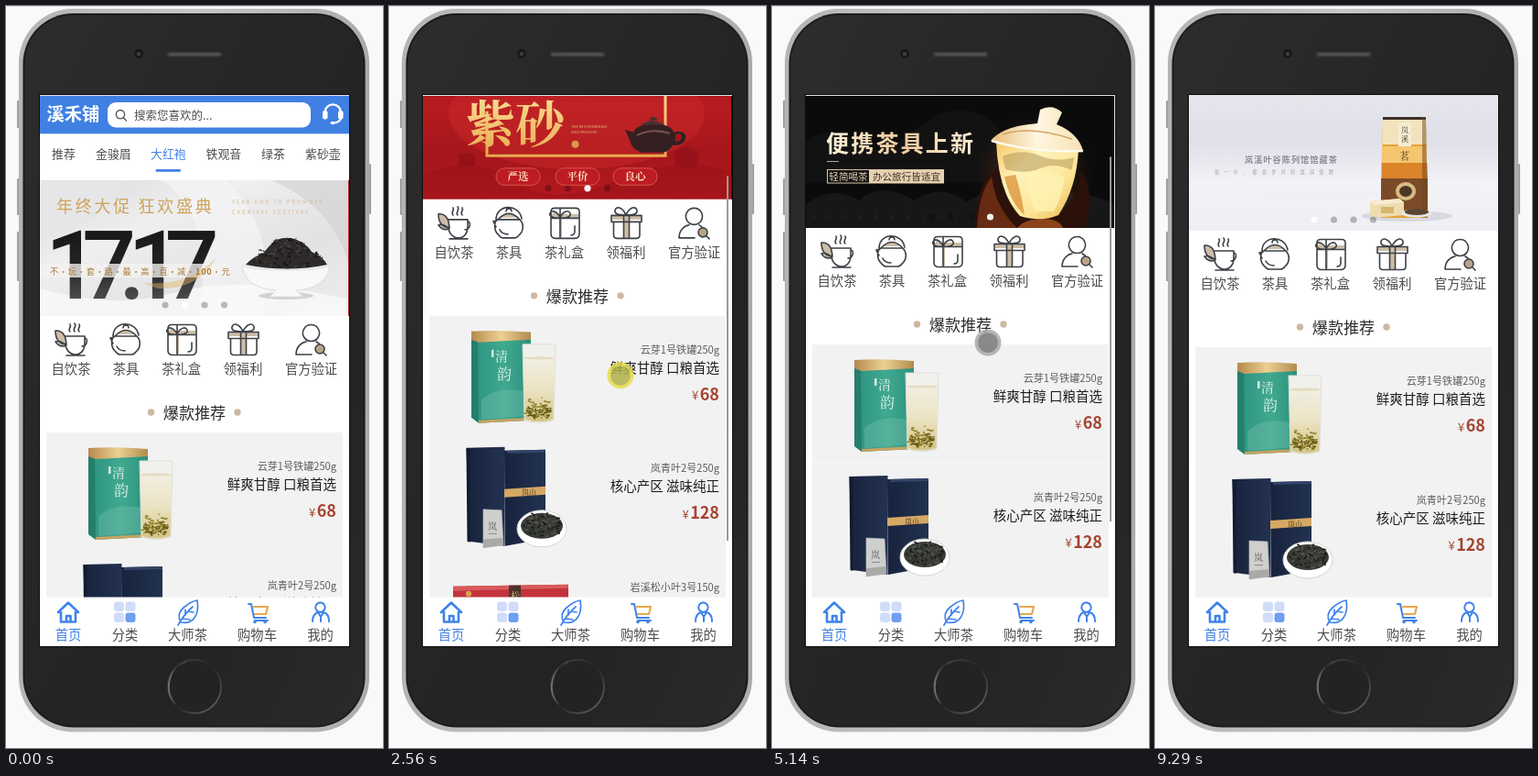
Recreate the animation shown at these times as an HTML page. Size 412 by 809 pixels, loop 9950 ms.

```html
<!DOCTYPE html>
<html lang="zh">
<head>
<meta charset="utf-8">
<style>
html, body { margin: 0; width: 100%; height: 100%; overflow: hidden; background: #f8faf9; }
svg { display: block; width: 412px; height: 809px; font-family: "Noto Sans CJK SC", "Noto Sans CJK", "Noto Sans", sans-serif; }
.ln { fill: none; stroke: #3d4147; stroke-width: 1.6; stroke-linecap: round; stroke-linejoin: round; }
.bl { fill: none; stroke: #3f83ea; stroke-width: 2.2; stroke-linecap: round; stroke-linejoin: round; }
.serif { font-family: "Noto Serif CJK SC", "Noto Sans CJK SC", "Noto Serif", serif; }
</style>
</head>
<body>
<svg viewBox="0 0 412 809" xmlns="http://www.w3.org/2000/svg"></svg>
<script>
const LOOP = 9950, STRIDE = 337, PITCH = 129.5;
const svg = document.querySelector('svg');
const rect = (x, y, w, h, fill, rx = 0, more = '') =>
  `<rect x="${x}" y="${y}" width="${w}" height="${h}" fill="${fill}" rx="${rx}" ${more}/>`;
const oval = (x, y, rx, ry, fill, more = '') =>
  `<ellipse cx="${x}" cy="${y}" rx="${rx}" ry="${ry}" fill="${fill}" ${more}/>`;
const path = (d, fill, more = '') => `<path d="${d}" fill="${fill}" ${more}/>`;
const line = (d, cls = 'ln', more = '') => `<path d="${d}" class="${cls}" ${more}/>`;
const text = (x, y, size, fill, s, more = '') =>
  `<text x="${x}" y="${y}" font-size="${size}" fill="${fill}" ${more}>${s}</text>`;
const mid = 'text-anchor="middle"', end = 'text-anchor="end"', bold = 'font-weight="700"';
const grad = (id, dir, ...stops) => `<linearGradient id="${id}" x2="${dir[0]}" y2="${dir[1]}">` +
  stops.map((c, i) => `<stop offset="${i / (stops.length - 1)}" stop-color="${c}"/>`).join('') + '</linearGradient>';

function random(seed) {
  return () => (seed = (seed * 16807) % 2147483647) / 2147483647;
}

// Loose tea: short curled strokes inside an ellipse
function leaves(x, y, rx, ry, n, colors, seed) {
  const r = random(seed);
  let out = '';
  for (let i = 0; i < n; i++) {
    const a = r() * 6.283, d = Math.sqrt(r());
    const px = x + Math.cos(a) * rx * d, py = y + Math.sin(a) * ry * d;
    out += `<path d="M${px.toFixed(1)} ${py.toFixed(1)}q${(r() * 6 - 3).toFixed(1)} ${(r() * 5 - 3).toFixed(1)} ${(r() * 9 - 4.5).toFixed(1)} ${(r() * 5 - 2.5).toFixed(1)}" stroke="${colors[i % colors.length]}" stroke-width="1.6" fill="none"/>`;
  }
  return out;
}

const defs = `<defs>
${grad('body', [1, 1], '#2d2d2e', '#272727', '#232323', '#2a2a2a')}
${grad('ring', [1, 0], '#b2b4b6', '#c6c7c9', '#a9abad')}
${grad('home', [1, 1], '#4a4a4a', '#242424', '#6a6a6a')}
${grad('home2', [1, 0], '#777', '#262626', '#4c4c4c')}
${grad('silver', [1, 1], '#d9d9db', '#efeff0', '#e2e2e4', '#eeeeef')}
${grad('num', [0, 1], '#111', '#242426', '#68686b')}
${grad('red', [0, 1], '#a3161c', '#b51b20', '#a5161b', '#b3191f')}
${grad('cream', [1, 0], '#fff3dc', '#edc99d', '#fff0d5')}
${grad('gold', [0, 1], '#ffe6a0', '#e8a94c')}
${grad('mist', [0, 1], '#e6e7ed', '#dfe0e8', '#f3f3f7', '#e2e3e9')}
${grad('tin', [1, 0], '#2f9683', '#41a890', '#2a917d')}
${grad('lid', [1, 0], '#b58a4c', '#ecd093', '#b28b4e')}
${grad('tea', [0, 1], '#f1eee2', '#ebe3c2', '#d3c486')}
${grad('navy', [1, 0], '#18233d', '#223250')}
${grad('cup', [1, 1], '#f4c766', '#fff3bd', '#fde596', '#e9b24a')}
${grad('cover', [1, 0], '#e8bd78', '#fff6e0', '#f6e2b4')}
<radialGradient id="glow"><stop offset="0" stop-color="#c4651d" stop-opacity=".6"/><stop offset="1" stop-color="#50210c" stop-opacity="0"/></radialGradient>
<clipPath id="screen"><rect x="37" y="97" width="338" height="601"/></clipPath>
<clipPath id="slot"><rect x="37" y="190" width="338" height="148"/></clipPath>
</defs>`;

function phone() {
  return rect(0, 0, 412, 809, '#f8faf9') + rect(0, 0, 412, 1, '#dfe1e1') +
    [[103, 30], [188, 40], [246, 54]].map(b => rect(12, b[0], 4, b[1], '#9fa1a3', 1)).join('') +
    rect(395, 172, 4, 55, '#9fa1a3', 1) +
    rect(14, 3, 383, 788.5, 'url(#ring)', 59) + rect(18.5, 8, 374, 778.5, '#1c1c1c', 55) +
    rect(20.5, 10, 370, 774.5, 'url(#body)', 53) +
    oval(145, 52, 4.8, 4.8, '#171717') + oval(145, 52.3, 2.2, 2.2, '#3c3d48') +
    rect(176, 50, 60, 5.6, '#3d3d3d', 2.5) + rect(178, 51.3, 56, 3, '#535353', 1.5, 'stroke="#2c2c2c" stroke-dasharray="1 1" stroke-width=".6"') +
    oval(206, 742, 29, 29, '#232323', 'stroke="url(#home)" stroke-width="1.8"') +
    path('M186 762A29 29 0 0 1 196 715', 'none', 'stroke="url(#home2)" stroke-width="1.6"') +
    rect(36, 96, 340, 603, '#0c0c0c');
}

function shortcuts() {
  const tan = '#cdbda6';
  const art = [
    path('M54 354q11-1 12 15q-12-1-12-15z', tan) + path('M56 366q6-2 10 4q-7 2-10-4z', tan) +
      line('M54 354q11-1 12 15q-12-1-12-15zM65 360h21v8c0 7-4 12-10 12s-11-5-11-12M86 362c4 0 3 9-3 9M66 381h20M54 366q5-2 12 4q-7 3-12-4M70 355c-3-3 2-5 0-8M75 355c-3-3 3-5 0-9M80 355c-3-3 2-5 0-8'),
    path('M121 358q10-9 20 0z', tan) +
      line('M118 360h25c5 5 4 13-1 17q-2 3-5 3h-12q-3 0-5-3c-5-4-6-12-2-17zM120 359q11-11 22 0M128 351c0-4 6-4 6 0M117 368l-3-6 4-1M117 360c0-17 25-18 28-1M121 371c2 4 5 5 9 5'),
    path('M177 354h31v5h-31zM180 350l8 7-10 1z', tan) + rect(186, 358, 3, 21, tan) +
      line('M181 347.500h23q4 0 4 4v24q0 5-5 5h-21q-5 0-5-5v-24q0-4 4-4zM177 358.500h31M187 348v32M187 358c-3-7-9-9-11-5s6 6 11 5c3-7 9-9 11-5s-6 6-11 5M203 367v6q0 4-4 4'),
    rect(256, 357, 6, 23, tan) + path('M244 356h32v4h-32z', tan) +
      line('M243 355.500h33v7h-33zM245.500 363v14q0 3.500 3.500 3.500h21.500q3.500 0 3.500-3.500v-14M256.500 356v24M262.500 356v24M259 355c-4-9-11-10-12-5s7 5 12 5c4-9 11-10 12-5s-7 5-12 5'),
    oval(343, 374, 5, 5, '#b9a386') + line('M333.500 347.500a9 9 0 1 1-.1 0zM334 380h-17c0-8 5-13 11-14M339 366l3 2M347 378l3 3M338 374a5 5 0 1 0 10 0a5 5 0 1 0-10 0')
  ];
  return art.join('') + [[71, '自饮茶'], [131, '茶具'], [191.500, '茶礼盒'], [259, '领福利'], [333.500, '官方验证']]
    .map(([x, s]) => text(x, 401, 14.3, '#4c4c4c', s, mid)).join('');
}

const tinBox = y => `<g transform="translate(0 ${y})">` +
  path('M90 482l8 2v98l-8-6z', '#247e6c') + path('M97 484l58-1v96l-57 3z', 'url(#tin)') +
  path('M90 482q30-2 65 1v8l-57 3-8-3z', 'url(#lid)') + path('M98 582l57-3v-3l-57 3z', '#c7a361') +
  path('M101 556q20-16 50-8l2 26-52 4z', '#7dc4b0', 'opacity=".35"') +
  text(116, 514, 14, '#e9f5ee', '清', 'class="serif"') + text(118, 534, 16, '#e9f5ee', '韵', 'class="serif"') +
  rect(112, 502, 2.5, 8, '#d8ebdf') +
  path('M146 496h36l-2 83q-16 5-32 0z', '#f1f1ec', 'stroke="#dededa"') +
  path('M147 511h34l-1.500 67q-15 5-31 0z', 'url(#tea)') + oval(164, 511, 17, 1.6, '#e3dcc0') +
  leaves(164, 570, 14, 8, 60, ['#776b1d', '#95862e', '#5d5417'], 11) +
  leaves(164, 560, 13, 6, 12, ['#93832d'], 5) + '</g>';

const blueBoxes =
  path('M84.500 609l42-1v108l-39-5z', 'url(#navy)') + path('M84.500 609l4 2v101l-3-1z', '#121b30') +
  path('M126 612l45-1v97l-44 8z', 'url(#navy)') + path('M129 612l42-1v3l-42 1z', '#33456a') +
  path('M126 654l45-3v9l-45 3z', '#d5a864') + text(145, 660.5, 8, '#3b2c1a', '岚山', 'class="serif"') +
  path('M103 676l20 1 2 38-22 3z', '#cfcfce', 'stroke="#b9b9b7" stroke-width=".7"') + path('M103 709l22-2v8l-22 3z', '#a9a9a8') +
  text(108, 698, 10, '#555', '岚', 'class="serif"') + rect(109, 702, 9, 1, '#8d8d8b') +
  oval(167, 697, 27, 20, '#fff', 'stroke="#d4d4d2"') + oval(167, 694, 23, 14, '#3a3c37') +
  leaves(167, 693, 22, 13, 90, ['#191c1a', '#2d312b', '#53564c'], 23);

const redBox =
  path('M70 760l126-2v62l-126-17z', '#c2333c') + path('M70 760l126-2v4l-126 3z', '#d95a5c') +
  path('M70 797l126 15v8l-126-17z', '#98232d') + path('M131 759h13v54l-12-2z', '#4c332b') +
  text(133, 774, 10, '#e3c395', '松', 'class="serif"') + text(133, 787, 10, '#e3c395', '叶', 'class="serif"') +
  oval(87, 768, 3.2, 3.2, '#d7a24f') +
  oval(160, 813, 36, 18, '#fff', 'stroke="#d5d5d3"') + oval(160, 812, 30, 13, '#34302c') +
  leaves(160, 811, 29, 13, 100, ['#171513', '#2f2a26', '#57504a'], 37);

function list() {
  const items = [
    ['云芽1号铁罐250g', '鲜爽甘醇 口粮首选', 68, tinBox(0)],
    ['岚青叶2号250g', '核心产区 滋味纯正', 128, blueBoxes],
    ['岩溪松小叶3号150g', '难以忘怀的桂花香', 99, redBox],
    ['雪峰芽4号铁罐250g', '清香悠长 回味甘甜', 88, tinBox(PITCH * 3)]
  ];
  return items.map(([name, slogan, price, art], i) => {
    const y = 465 + PITCH * i, w = String(price).length * 10.4;
    return rect(44, y, 324, PITCH, '#f2f2f2') + rect(44, y + PITCH - 1, 324, 1, '#f6f6f6') + art +
      text(361, y + 41, 11.1, '#5c5c5c', name, end) + text(361, y + 62, 14.5, '#1c1c1c', slogan, end) +
      text(361, y + 92, 18, '#a5432f', price, `${end} ${bold}`) +
      text(359 - w, y + 91.5, 13, '#a5432f', '¥', end);
  }).join('');
}

function header() {
  const tabs = [[50, '推荐'], [98, '金骏眉'], [158, '大红袍'], [218.5, '铁观音'], [279, '绿茶'], [327, '紫砂壶']];
  return rect(37, 97, 338, 42.5, '#4080e2') +
    text(44.5, 125, 19.3, '#fff', '溪禾铺', 'font-weight="900"') +
    rect(111, 105, 222, 27.5, '#fff', 9) +
    line('M125 113.500a4.700 4.700 0 1 1-.1 0M128.500 122l3 3', 'ln', 'style="stroke:#555;stroke-width:1.300"') +
    text(140, 123.5, 12.5, '#4c4c4c', '搜索您喜欢的...') +
    line('M348.500 118v-2a8.700 8.700 0 0 1 17.400 0v5q0 6-8 6.500', 'ln', 'style="stroke:#fff;stroke-width:2.200"') +
    rect(346, 114, 5.5, 9.5, '#fff', 2.3) + rect(363, 114, 5.5, 9.5, '#fff', 2.3) + oval(357, 127.5, 2.5, 1.8, '#fff') +
    rect(37, 139.5, 338, 50, '#fff', 0, 'fill-opacity=".78"') +
    tabs.map(([x, s], i) => text(x, 165.5, 12.9, i === 2 ? '#4080e2' : '#4c4c4c', s)).join('') +
    rect(163.5, 178, 27.5, 2.8, '#4080e2', 1.4);
}

const slides = [
  rect(37, 0, 338, 148, 'url(#silver)') +
    path('M37 0h92q-30 50-92 66z', '#e6e6e8') + path('M170 0q60 40 40 148h70q20-90-40-148z', '#f6f6f7', 'opacity=".7"') +
    path('M290 0q70 30 85 95v-95z', '#d0d0d3', 'opacity=".6"') + path('M37 118q80 24 150 4t188 8v18H37z', '#fafafa', 'opacity=".8"') +
    text(55, 35, 18, '#cda45c', '年终大促 狂欢盛典', 'letter-spacing="2.7"') +
    text(247, 25.5, 5.6, '#d3b98d', 'YEAR-END TO PROMOTE', 'letter-spacing="2"') +
    text(247, 36.5, 5.6, '#d3b98d', 'CARNIVAL FESTIVAL', 'letter-spacing="2"') +
    text(43, 129, 104, 'url(#num)', '17.17', 'font-family="Roboto, sans-serif" font-weight="500" letter-spacing="-19"') +
    rect(37, 91, 207, 15, '#f4f3f0', 0, 'opacity=".78"') +
    path('M150 112q50 4 80-28q-20 36-64 34z', '#e0b763', 'opacity=".45"') +
    text(48, 102.5, 9.2, '#a87b3b', '不·玩·套·路·最·高·直·减·<tspan font-weight="700">100</tspan>·元', 'letter-spacing=".75"') +
    oval(306, 126, 30, 4, '#c4c4c6', 'opacity=".7"') + path('M258 93q4 25 37 27l-7 7h37l-8-7q33-2 37-27z', '#f8f8f8', 'stroke="#dcdcdd"') +
    oval(306, 93, 48, 6, '#e9e9ea') + path('M262 92q8-9 20-13q6-9 14-14q12-5 24 1q10 5 14 12q13 6 17 14q-44 9-89 0z', '#2e2b2a') +
    leaves(306, 84, 41, 11, 70, ['#191717', '#474240', '#2a2625'], 51) + leaves(308, 71, 18, 8, 28, ['#191717', '#474240'], 13),
  rect(37, 0, 338, 148, 'url(#red)') + oval(205, 55, 140, 60, '#cc2c2b', 'opacity=".45"') +
    path('M37 120q60-22 100 8t110 0t128-10v30H37z', '#8d1016', 'opacity=".35"') +
    path('M312 96q12-9 26 0v14q-13 7-26 0zM76 100q9-5 18 0v12h-18z', '#8d1016', 'opacity=".6"') +
    path('M107 52v48.500h195v-88H200', 'none', 'stroke="url(#gold)" stroke-width="3"') +
    text(84, 86, 54, 'url(#gold)', '紫砂', 'class="serif" font-weight="900"') +
    text(199, 70, 4.1, '#e9b678', 'THE RECOMMENDED') + text(199, 76, 4.1, '#e9b678', 'SALE PAVILION') +
    oval(203.5, 88, 4, 4, '#d99a4d') +
    path('M258 72l9 3q4-9 21-9q21 0 23 9l4-1q11 0 9 8t-14 7q-3 6-10 8h-25q-10-5-11-11z', '#342021') +
    path('M313 77q7-2 7 3t-7 5z', '#9d171b') + path('M275 67q11-9 27 0zM285 62q0-4 4-4t4 4z', '#493031') +
    path('M271 78q17-8 36-2', 'none', 'stroke="#795452" stroke-width="2"') +
    [[141, '严选'], [206, '平价'], [269, '良心']].map(([x, s]) => rect(x - 24, 114, 48, 18.5, '#bd1c22', 9, 'stroke="#d55649" stroke-width="1"') +
      text(x, 127.5, 11.5, '#ffe3bd', s, `${mid} ${bold} class="serif"`)).join(''),
  rect(37, 0, 338, 148, '#0b0b0c') + path('M37 122q30-22 58-4q26-22 60 0q30-20 58 2q38-28 76-2q40-18 86 4v26H37z', '#171718') +
    path('M37 54q30-22 54 0t70-16t86 0v60H37z', '#121213') + oval(286, 90, 66, 66, 'url(#glow)') +
    path('M222 148q0-36 14-58l12-8q6 38 30 54h34q22-20 26-50q16 24 4 62z', '#2c110a') +
    path('M224 148q2-38 16-56q4 34 28 56z', '#7a3414', 'opacity=".75"') + path('M268 148q8-10 28-10q18 0 22 10z', '#8d431b') +
    path('M245 54l90 8q-2 42-22 72q-18 8-42 1q-24-26-26-81z', 'url(#cup)') +
    path('M252 70q20-9 40-1t38 2q-1 9-3 14q-18-9-34-2t-38 1z', '#a58446', 'opacity=".45"') +
    path('M254 92q6 28 22 42q-4-26-10-44z', '#d98a2e', 'opacity=".7"') + path('M278 90q26-8 42 4q-4 22-12 36h-20q-10-18-10-40z', '#fff4b6', 'opacity=".75"') +
    path('M239 53q12-16 51-19l3-15q13-7 24 3l-6 13q24 10 29 29q-50 0-101-11z', 'url(#cover)') +
    path('M240 53q44 13 100 11', 'none', 'stroke="#fffaf0" stroke-width="2.500"') + path('M252 46q30-10 76 5', 'none', 'stroke="#d3a566" stroke-width="1.500"') +
    text(59, 64.5, 25, 'url(#cream)', '便携茶具上新', `${bold} letter-spacing="2.2"`) +
    rect(60, 75, 13, 1, '#bba98f') + rect(60.5, 84.5, 127, 14.5, 'none', 0, 'stroke="#d9c3a1" stroke-width="1"') +
    rect(106, 84.5, 82, 14.5, '#e6d2b0') + text(83.5, 95.7, 10.6, '#e6d2b0', '轻简喝茶', mid) +
    text(147, 95.7, 10.6, '#3a3027', '办公旅行皆适宜', mid) +
    Array.from({ length: 11 }, (_, i) => oval(46 + i * 17, 135, 1, 1.5, '#2a2a2b')).join(''),
  rect(37, 0, 338, 148, 'url(#mist)') + path('M37 104q160 20 338-8v52H37z', '#f4f4f8', 'opacity=".7"') + oval(275, 132, 50, 6, '#c9cad4', 'opacity=".6"') +
    text(98, 73.5, 9.2, '#8b8b95', '岚溪叶谷陈列馆馆藏茶', `${bold} letter-spacing="1"`) +
    text(65, 85.5, 5.2, '#a3a3ad', '每一叶，都是岁月的温润馈赠', 'letter-spacing="5.2"') +
    path('M249 24h47l2 110h-51z', '#e8a034') + path('M249 24h47l.5 30h-48z', '#f2e3bd') + path('M249 24h47v3h-47z', '#3c3026') +
    path('M248 56h49v18h-49.500z', '#f3c66f') + path('M247.500 74h50l.5 17h-50.500z', '#dc8429') + path('M247 91h51v39h-51z', '#7b4b27') +
    path('M292 24h4l2 110h-6z', '#6d4520', 'opacity=".5"') + rect(266, 30, 14, 26, '#f5ecd3') +
    text(273, 41, 8, '#4a3825', '岚', `${mid} class="serif"`) + text(273, 51, 8, '#4a3825', '溪', `${mid} class="serif"`) +
    text(273, 71, 11, '#5a3b1d', '茗', `${mid} class="serif"`) + oval(274, 105, 11, 10, '#d8bb84') + oval(274, 105, 7, 6, '#4e3825') +
    path('M235 116l32-3 5 4v14l-33 3-4-3z', '#eddcb0') + path('M235 116l32-3 5 4-33 3z', '#f7ecd0') + rect(247, 122, 14, 7, '#d6b76c') +
    oval(286, 129, 17, 4.5, '#e8e6e3') + oval(286, 127.5, 13, 3.4, '#5c4331')
].map((s, i) => `<g transform="translate(${i * STRIDE} 190)">${s}</g>`).join('');

function nav() {
  const labels = [[68, '首页'], [130, '分类'], [198.5, '大师茶'], [274.5, '购物车'], [343.5, '我的']];
  return rect(37, 644.5, 338, 54, '#fff') +
    line('M57 661l11-10.500 11 10.500M60 660v11.500h16v-11.500M66 671v-6h4.500v6', 'bl', 'style="stroke-width:2.600"') +
    rect(118, 649.5, 11, 10.5, '#d0dcf8', 3) + rect(130.5, 649.5, 11, 10.5, '#d0dcf8', 3) + rect(118, 661.5, 11, 10.5, '#d0dcf8', 3) + rect(130.5, 661.5, 11, 10.5, '#6f9ef2', 3) +
    line('M209 648q2 12-3 19t-15 5q-5-9 3-16t15-8zM188 675q6-11 16-20M196 664v-6M199 660l6 1M193 668l8 1', 'bl', 'style="stroke-width:1.700"') +
    line('M265 652h3l3 15h13M272 670h14', 'bl', 'style="stroke-width:2"') + line('M271 655h15l-2 8h-12', 'bl', 'style="stroke:#e6a84e"') +
    oval(272, 671.5, 1.8, 1.8, '#3f83ea') + oval(283, 671.5, 1.8, 1.8, '#3f83ea') +
    line('M343.500 650.500a5.200 5.200 0 1 1-.1 0M335 671c0-6 3-9 6-10l3 5 3-5c4 1 6 4 6 10M344 667v4', 'bl', 'style="stroke-width:2"') +
    labels.map(([x, s], i) => text(x, 691, 14.3, i ? '#4c4c4c' : '#4080e2', s, mid)).join('');
}

svg.innerHTML = defs + phone() + `<g clip-path="url(#screen)">${rect(37, 97, 338, 601, '#fff')}
<g id="page">${shortcuts()}${oval(158.5, 443, 3.7, 3.7, '#cdb9a0')}${oval(253, 443, 3.7, 3.7, '#cdb9a0')}${text(206, 450, 17.1, '#2c2c2c', '爆款推荐', mid)}${list()}</g>
${header()}<g id="banner"><g clip-path="url(#slot)"><g id="strip">${slides}</g></g>
${[174, 195.5, 217, 238.5].map(x => oval(x, 326, 3.6, 3.6, '#000', 'class="dot"')).join('')}</g>
${nav()}${rect(369, 100, 2, 398, '#999', 1, 'id="bar"')}${rect(37, 97, 338, 1, '#dde3ec')}</g>
<g id="touch"><circle r="14.500"/><circle r="10.800"/></g>`;

const $ = id => document.getElementById(id);
const page = $('page'), banner = $('banner'), strip = $('strip'), bar = $('bar'), touch = $('touch');
const dots = [...document.querySelectorAll('.dot')], [halo, core] = touch.children;

// Monotone cubic through [time, value] keys
function curve(keys, t) {
  const n = keys.length - 1;
  if (t <= keys[0][0]) return keys[0][1];
  if (t >= keys[n][0]) return keys[n][1];
  let i = 0;
  while (t >= keys[i + 1][0]) i++;
  const slope = k => (keys[k + 1][1] - keys[k][1]) / (keys[k + 1][0] - keys[k][0]);
  const tangent = k => {
    if (k < 1 || k >= n) return 0;
    const a = slope(k - 1), b = slope(k);
    return a * b <= 0 ? 0 : 2 * a * b / (a + b);
  };
  const [t0, v0] = keys[i], [t1, v1] = keys[i + 1], h = t1 - t0, u = (t - t0) / h;
  const e = u * u * (3 - 2 * u);
  return v0 + (v1 - v0) * e + h * u * (1 - u) * ((1 - u) * tangent(i) - u * tangent(i + 1));
}

const scrollKeys = [[1120, 0], [1670, 153], [2070, 186], [2140, 186], [2650, 122], [3190, 160], [3390, 195], [3990, 287],
  [4320, 287], [4750, 181], [5140, 96], [5490, 92], [5690, 94], [6200, 150], [6450, 144], [6660, 75], [7350, 75], [7880, 85], [8080, 85], [8140, 93]];
const xKeys = [[70, 394], [1060, 256], [1670, 254], [3390, 252], [4320, 250], [5140, 236], [5690, 221], [6450, 218], [7880, 219], [8750, 219], [9270, 373]];
const yKeys = [[70, 794], [1060, 530], [1670, 377], [2070, 344], [2140, 344], [2650, 408], [3190, 388], [3390, 353], [3990, 261],
  [4320, 261], [4750, 367], [5280, 367], [5690, 540], [6200, 484], [6450, 490], [6660, 559], [6860, 559], [7070, 489], [7350, 489], [7880, 479], [8750, 479], [9270, 789]];
const presses = [[1100, 2070], [2140, 3990], [4320, 4750], [5690, 6660], [7350, 8080]];
const turns = [830, 3840, 6830];

function draw(t) {
  const s = curve(scrollKeys, t), move = `translate(0 ${-s.toFixed(2)})`;
  page.setAttribute('transform', move);
  banner.setAttribute('transform', move);

  const turn = turns.reduce((p, at) => p + curve([[at, 0], [at + 260, 1]], t), 0);
  strip.setAttribute('transform', `translate(${(-turn * STRIDE).toFixed(2)} 0)`);
  const active = (Math.round(turn) + 1) % 4;
  dots.forEach((d, i) => {
    d.setAttribute('fill', i === active ? '#fff' : '#000');
    d.setAttribute('fill-opacity', i === active ? 0.92 : 0.26);
  });

  bar.setAttribute('y', 100 + s * 0.67);
  bar.setAttribute('opacity', t < 1120 ? 0 : 1 - curve([[8520, 0], [8610, 1]], t));

  const down = presses.some(([a, b]) => t >= a && t < b);
  touch.setAttribute('visibility', t >= 70 && t < 9280 ? 'visible' : 'hidden');
  touch.setAttribute('transform', `translate(${curve(xKeys, t).toFixed(2)} ${curve(yKeys, t).toFixed(2)})`);
  halo.setAttribute('fill', down ? '#e5df48' : '#a8a8a8');
  core.setAttribute('fill', down ? '#b0b046' : '#747474');
  touch.setAttribute('opacity', 0.84);
}

const start = performance.now();
function tick() {
  draw((performance.now() - start) % LOOP);
  requestAnimationFrame(tick);
}
tick();
</script>
</body>
</html>
```
